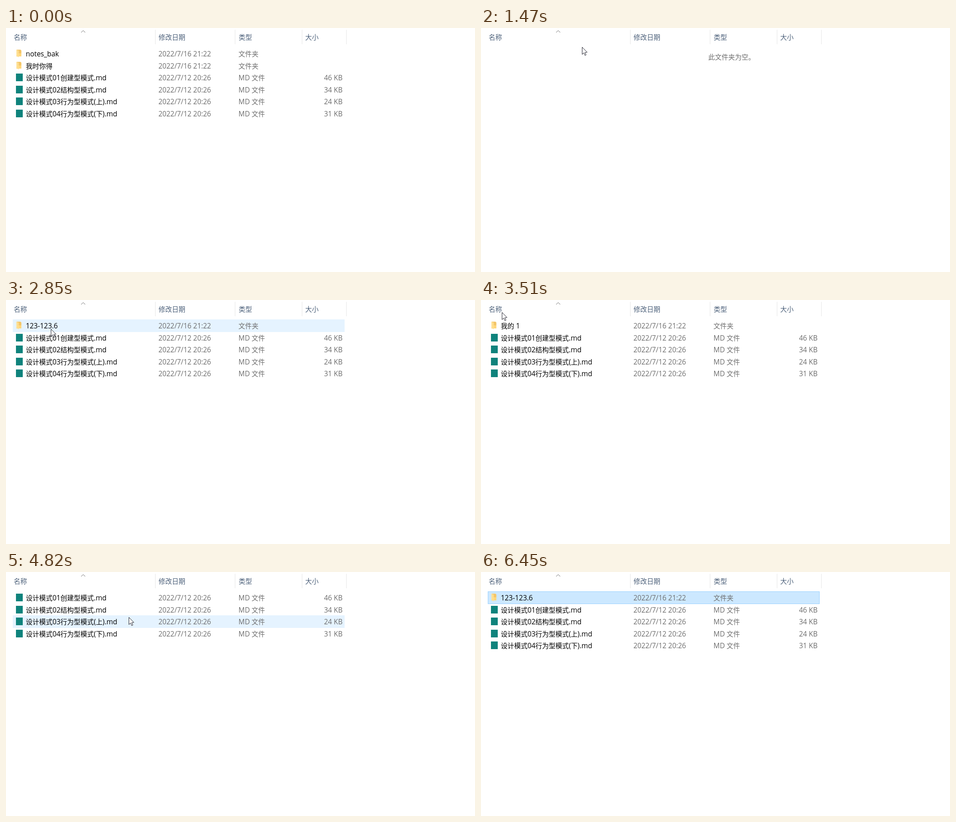
An HTML page with a canvas for the animation above (6.88 s loop, 1036x541 px).

```html
<!DOCTYPE html>
<html lang="zh-CN">
<head>
<meta charset="utf-8">
<title>文件夹浏览</title>
<style>
  html, body { margin: 0; width: 100%; height: 100%; overflow: hidden; background: #fff; }
  canvas { display: block; }
</style>
</head>
<body>
<canvas id="stage" width="1036" height="541"></canvas>
<script>
const ctx = document.getElementById('stage').getContext('2d');
const LOOP = 6880;
const PITCH = 26.5;
const LATIN = '15.4px "Open Sans", "Noto Sans", sans-serif';
const CJK = '14.75px "Noto Sans CJK SC", "Noto Sans CJK", sans-serif';
const HOVER = { fill: '#e5f3ff' };
const SELECTED = { fill: '#cce8ff', border: '#99d1ff' };
const PRESSED = { fill: '#d6e8f8' };

const folder = name => ({ name, date: '2022/7/16 21:22', type: '文件夹' });
const files = [['01创建型模式', 46], ['02结构型模式', 34], ['03行为型模式(上)', 24], ['04行为型模式(下)', 31]]
  .map(([title, kb]) => ({
    name: `设计模式${title}.md`, date: '2022/7/12 20:26', type: 'MD 文件', size: `${kb} KB`
  }));
const home = [folder('notes_bak'), folder('我时你得'), ...files];
const outer = [folder('123-123.6'), ...files];
const inner = [folder('我的 1'), ...files];
const empty = [];
const loading = [];

// Each state: start time, listed rows, selected row, selection style
const states = [
  [0, home],
  [1200, home, 0, SELECTED],
  [1470, empty],
  [2040, loading],
  [2260, home, 0, SELECTED],
  [2570, home, 1, SELECTED],
  [2720, outer],
  [2980, outer, 0, SELECTED],
  [3380, inner],
  [4030, inner, 0, PRESSED],
  [4360, files],
  [6210, inner, 0, SELECTED],
  [6450, outer, 0, SELECTED]
];

// Pointer moves: first step, last step, number of steps, destination
const moves = [
  [130, 130, 1, 542, 455],
  [330, 800, 7, 225, 45],
  [1070, 1330, 3, 223, 42],
  [1600, 1730, 2, 30, -26],
  [2260, 2260, 1, 138, 71],
  [2410, 2410, 1, 138, 73],
  [2570, 2570, 1, 130, 74],
  [2720, 2850, 2, 99, 64],
  [3380, 3640, 3, 20, 8],
  [3770, 4030, 3, 114, 50],
  [4160, 4160, 1, 116, 51],
  [4560, 5210, 6, 426, 148],
  [5340, 5590, 3, 250, 23],
  [6090, 6090, 1, 30, -30]
];

function pointerAt(time) {
  let x = 0, y = -40;
  for (const [start, end, steps, toX, toY] of moves) {
    if (time < start) break;
    const gap = (end - start) / (steps - 1 || 1) || 1;
    const done = Math.min(steps, Math.floor((time - start) / gap + 0.01) + 1) / steps;
    x += (toX - x) * done;
    y += (toY - y) * done;
  }
  return { x: Math.round(x), y: Math.round(y) };
}

function rect(x, y, w, h, color) {
  ctx.fillStyle = color;
  ctx.fillRect(x, y, w, h);
}

function polygon(points, fill) {
  ctx.beginPath();
  points.forEach(([x, y]) => ctx.lineTo(x, y));
  ctx.closePath();
  ctx.fillStyle = fill;
  ctx.fill();
}

// Latin and Chinese runs use separate fonts on one baseline
function text(str, x, baseline, color, alignRight) {
  const runs = str.match(/[\x00-\x7f]+|[^\x00-\x7f]+/g)
    .map(run => ({ run, font: run.charCodeAt(0) < 128 ? LATIN : CJK }));
  for (const item of runs) {
    ctx.font = item.font;
    item.width = ctx.measureText(item.run).width;
  }
  if (alignRight) x -= runs.reduce((sum, item) => sum + item.width, 0);
  ctx.fillStyle = color;
  for (const { run, font, width } of runs) {
    ctx.font = font;
    ctx.fillText(run, x, baseline);
    x += width;
  }
}

function drawHeader() {
  [['名称', 17], ['修改日期', 337], ['类型', 514], ['大小', 661]]
    .forEach(([label, x]) => text(label, x, 26, '#4c607a'));
  [330, 506, 654, 752].forEach(x => rect(x - 0.5, 4, 1, 32, '#e5e5e5'));
  ctx.beginPath();
  ctx.moveTo(166, 10);
  ctx.lineTo(170.5, 5.5);
  ctx.lineTo(175, 10);
  ctx.strokeStyle = '#6d6d6d';
  ctx.lineWidth = 1;
  ctx.stroke();
}

function drawFolder(y) {
  polygon([[23, y - 9], [32, y - 9], [34, y - 7], [34, y + 6], [23, y + 6]], '#f3c66b');
  polygon([[23, y - 9], [28, y - 7], [28, y + 8], [23, y + 5]], '#ffdf91');
  rect(28, y - 1, 6, 7, '#ffd77c');
}

function drawRow(row, index, style) {
  const y = Math.round(57 + PITCH * index);
  const baseline = y + 6;
  if (style) {
    rect(15, y - 14, 733, 28, style.fill);
    if (style.border) {
      ctx.strokeStyle = style.border;
      ctx.lineWidth = 1;
      ctx.strokeRect(15.5, y - 13.5, 732, 27);
    }
  }
  if (row.size) rect(22, y - 9, 15, 17, '#0f837c');
  else drawFolder(y);
  text(row.name, 43.7, baseline, '#000');
  text(row.date, 336.7, baseline, '#6d6d6d');
  text(row.type, 513.5, baseline, '#6d6d6d');
  if (row.size) text(row.size, 743.5, baseline, '#6d6d6d', true);
}

function drawPointer({ x, y }) {
  ctx.save();
  ctx.translate(x + 0.5, y + 0.5);
  polygon([[0, 0], [0, 16], [3.7, 12.6], [6.2, 18.3], [8.7, 17.2], [6.2, 11.7], [11, 11.4]], '#fff');
  ctx.strokeStyle = '#22222e';
  ctx.lineWidth = 1;
  ctx.stroke();
  ctx.restore();
}

function draw(time) {
  const [, rows, selected, style] = states.filter(([start]) => start <= time).pop();
  const pointer = pointerAt(time);
  const hovered = Math.floor((pointer.y - 45) / PITCH);
  rect(0, 0, 1036, 541, '#fff');
  drawHeader();
  rows.forEach((row, i) => {
    const overRow = i === hovered && pointer.x < 748;
    drawRow(row, i, i === selected ? style : overRow ? HOVER : null);
  });
  if (rows === empty) text('此文件夹为空。', 502, 70, '#6d6d6d');
  drawPointer(pointer);
}

const began = performance.now();
function tick() {
  draw((performance.now() - began) % LOOP);
  requestAnimationFrame(tick);
}
tick();
</script>
</body>
</html>
```
